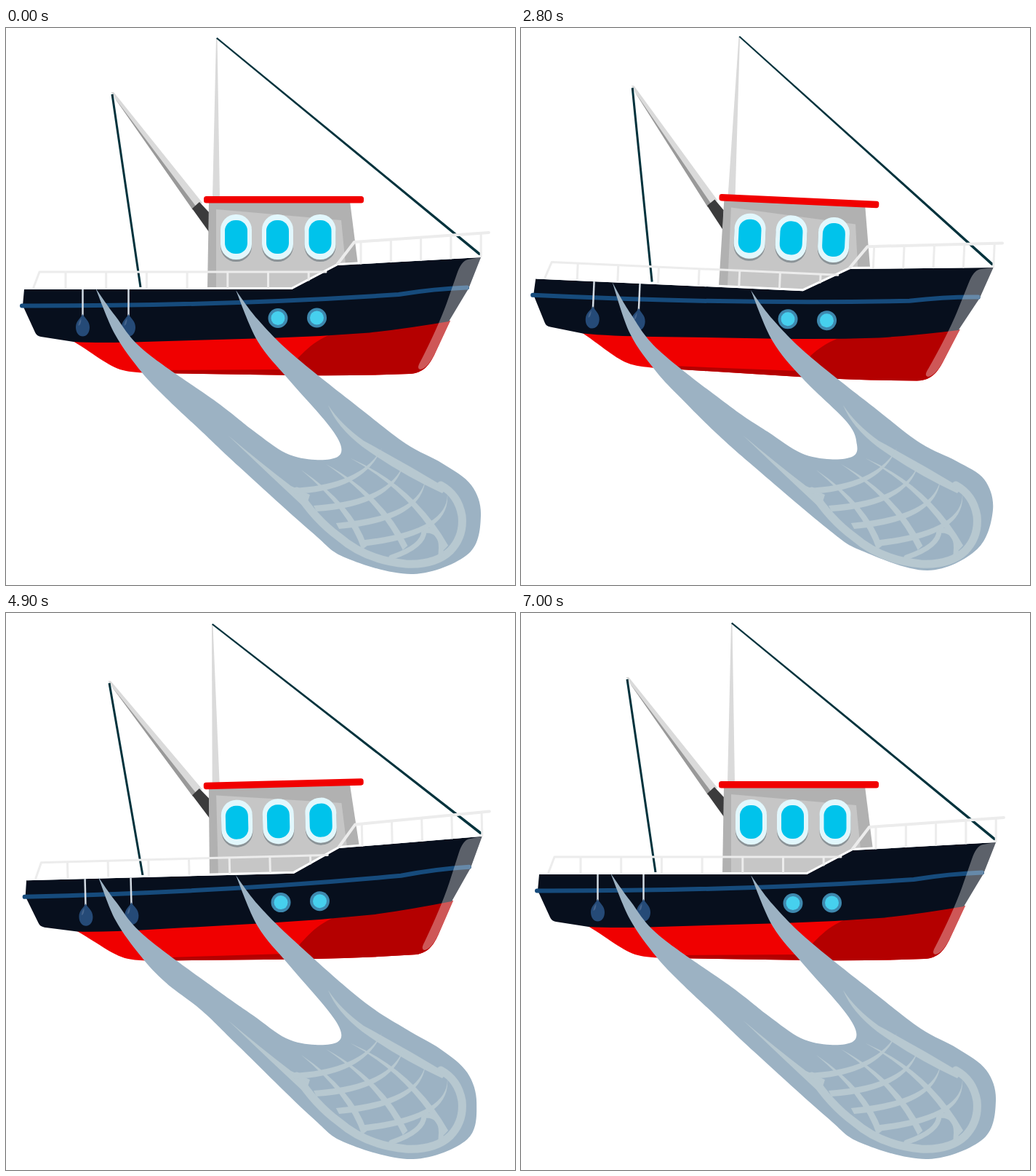
An HTML page for the animation above (7.7 s loop, 700 by 765 pixels).

```html
<!DOCTYPE html>
<html lang="en">
<head>
<meta charset="utf-8">
<title>Fishing boat</title>
<style>
html, body { margin: 0; width: 100%; height: 100%; overflow: hidden; background: #fff; }
svg { display: block; width: 100vw; height: 100vh; }
.line { fill: none; stroke-linecap: round; stroke-linejoin: round; }
</style>
</head>
<body>
<svg viewBox="0 0 700 765">
  <defs>
    <g id="window">
      <rect x="-21.500" y="-28" width="43" height="62" rx="21" fill="#8b9397"/>
      <rect x="-21.500" y="-31" width="43" height="62" rx="21" fill="#e2f7fc"/>
      <rect x="-15.500" y="-23" width="31" height="46" rx="14.500" fill="#00c3eb"/>
    </g>
    <g id="fender">
      <path d="M0 359V397" stroke="#d3dbe3" stroke-width="2.500"/>
      <path d="M0 393C3 399 9.500 402 9.500 411C9.500 419 5 423.500 0 423.500S-9.500 419-9.500 411C-9.500 402-3 399 0 393Z" fill="#254a77"/>
      <path d="M-2 399Q-6 404-6 409Q-2 408-2 399Z" fill="#45648c"/>
    </g>
    <g id="porthole">
      <circle r="13.500" fill="#3e88ae"/>
      <circle r="9.500" fill="#46d0ee"/>
    </g>
  </defs>

  <g id="boat">
    <!-- rigging -->
    <path d="M289 14H290.500L294 233H284Z" fill="#dadada"/>
    <path d="M289 14.500L290.500 13L653.500 310L651.500 313Z" fill="#00323c"/>
    <path d="M144.500 88H148L270 240L257 250Z" fill="#dadada"/>
    <path d="M145 90L262 246L257 250Z" fill="#999"/>
    <path d="M266 239L256 248L279 280V253Z" fill="#3b3b3c"/>
    <path d="M146 91L185 356" stroke="#00323c" stroke-width="3"/>

    <!-- cabin -->
    <path d="M279 238H473L484 325L393 358H277Z" fill="#b1b1b1"/>
    <path d="M289 249L461 264L467 325L393 358H289Z" fill="#c6c6c6"/>
    <rect x="272" y="231" width="220" height="9.500" rx="3.500" fill="#f10000"/>
    <use href="#window" x="316.500" y="287"/>
    <use href="#window" x="373.500" y="287"/>
    <use href="#window" x="432" y="287"/>

    <!-- hull -->
    <path d="M92 430C125 450 143 467 165 471Q180 474 210 474L400 477Q480 478 555 475C574 474 582 463 589 449L611 402L400 400Z" fill="#f00000"/>
    <path d="M195 470L386 469C402 455 416 432 449 420L611 402L589 449C582 463 574 474 555 475Q480 478 400 477L210 474Z" fill="#b40000"/>
    <path d="M25 359H393L456 326L653 315L636 358L609 403Q550 413 500 418.500Q430 424 360 426L190 431Q130 433 93 431L48 424Q42 423 40 418L23 381Z" fill="#070f1d"/>
    <path class="line" d="M26 357.500H393L456 324.500L653 313.500" stroke="#fff" stroke-width="3"/>
    <path class="line" d="M22 381.500Q300 382 540 366Q590 358 634 356.500" stroke="#164b7c" stroke-width="6"/>
    <path d="M653 315L636 358L611 404L590 447Q580 467 570 469Q564 468 570 458Q594 411 606 378L620 338Q626 320 635 318Z" fill="#fff" opacity=".34"/>
    <use href="#porthole" x="374" y="398.500"/>
    <use href="#porthole" x="427.500" y="398"/>
    <use href="#fender" x="105.500"/>
    <use href="#fender" x="168.500"/>

    <!-- railings -->
    <g class="line" stroke="#ececec" stroke-width="3">
      <path d="M38 356L46 335H440"/>
      <path d="M456 324L479 294L664 281" stroke-width="4"/>
      <path id="posts"/>
    </g>
  </g>

  <path id="net" fill="#9cb2c3"/>
  <g fill="#b7c8d0">
    <path d="M306 560Q350 597 392 629L418 641L412 660Q357 609 306 560Z"/>
    <path d="M443 518Q460 544 492 567Q550 598 606 632L600 639Q540 611 490 575Q455 548 443 518Z"/>
    <path class="line" d="M400 636Q425 675 458 699Q495 731 550 736Q590 738 611 718Q630 698 627 670Q622 641 598 628" stroke="#b7c8d0" stroke-width="11"/>
    <path class="line" d="M530 727Q575 712 575 690Q602 688 598 722" stroke="#b7c8d0" stroke-width="7"/>
    <path id="mesh"/>
  </g>
</svg>
<script>
const STEP = 700, FRAMES = 11;
const [boat, posts, net, mesh] = ["boat", "posts", "net", "mesh"].map(id => document.getElementById(id));
const each = (n, make) => Array.from({ length: n }, (_, i) => make(i)).join("");

posts.setAttribute("d",
  each(7, i => `M${82 + 55.7 * i} 336V${i < 6 ? 356 : 346}`) +
  each(5, i => `M${488 + 41.3 * i} ${293.500 - 2.9 * i}V${323 - 2.3 * i}`));

// A strand grows from a point at its top to full width at its foot.
function strand(x, y, cx, cy, ex, ey, w = 9) {
  const len = Math.hypot(ex - x, ey - y), nx = (y - ey) / len * w / 2, ny = (ex - x) / len * w / 2;
  return `M${x} ${y}Q${cx + nx} ${cy + ny} ${ex + nx} ${ey + ny}L${ex - nx} ${ey - ny}Q${cx - nx} ${cy - ny} ${x} ${y}Z`;
}
mesh.setAttribute("d",
  each(4, i => strand(517 + 30 * i, 577 + 21 * i, 490 + 40 * i, 632 + 21 * i, 394 + 31 * i, 636 + 24 * i)) +
  each(3, i => strand(474 - 34 * i, 591 + 8 * i, 558 - 42 * i, 632 + 13 * i, 605 - 56 * i, 714)));

// Key points of the level net: outer edge from right rope to left, inner edge back.
const outer = [[316,360], [346,400], [395,449], [490,525], [550,571], [600,598], [640,628], [653,670], [636,722],
  [560,750], [468,728], [420,692], [320,602], [270,555], [220,508], [186,472], [150,421], [123,357]];
const inner = [[123,357], [150,395], [190,443], [290,514], [340,553], [385,584], [425,593], [456,589], [460,572],
  [440,541], [388,482], [346,430], [316,360]];

// Soft pulls on the net at full tilt: x, y, reach, dx, dy.
const bowDown = [[125,355,45,3,-9], [300,520,45,-3,7], [440,541,30,10,1], [645,640,60,-3,-9], [480,730,90,0,-12],
  [630,725,50,-10,-5]];
const bowUp = [[128,360,45,8,11], [300,520,45,-3,9], [275,590,50,0,-34], [490,525,40,-3,12], [645,650,65,-13,7]];

function pull(points, tilt) {
  return points.map(([x, y]) => {
    let px = x, py = y;
    for (const [cx, cy, reach, dx, dy] of tilt > 0 ? bowDown : bowUp) {
      const k = Math.abs(tilt) / 3 * Math.exp(-((x - cx) ** 2 + (y - cy) ** 2) / reach ** 2);
      px += dx * k;
      py += dy * k;
    }
    return [px, py];
  });
}

// Smooth curve through the points.
function curve(points) {
  const at = i => points[Math.max(0, Math.min(points.length - 1, i))];
  return each(points.length - 1, i => {
    const [p, a, b, q] = [i - 1, i, i + 1, i + 2].map(at);
    const c1 = a.map((v, n) => v + (b[n] - p[n]) / 6);
    const c2 = b.map((v, n) => v - (q[n] - a[n]) / 6);
    return `C${[...c1, ...c2, ...b]}`;
  });
}

// The bow dips along a sine, then rises and settles in even steps.
const tiltAt = k => k < 6 ? 3 * Math.sin(Math.PI * k / 6) : 1.5 * (Math.abs(k - 8) - 2);

const start = performance.now();
function draw(now) {
  const tilt = tiltAt(Math.floor(Math.max(0, now - start) / STEP) % FRAMES);
  boat.setAttribute("transform", `rotate(${tilt} 342 245.5)`);
  net.setAttribute("d", "M316 360" + curve(pull(outer, tilt)) + curve(pull(inner, tilt)) + "Z");
  requestAnimationFrame(draw);
}
draw(start);
</script>
</body>
</html>
```
